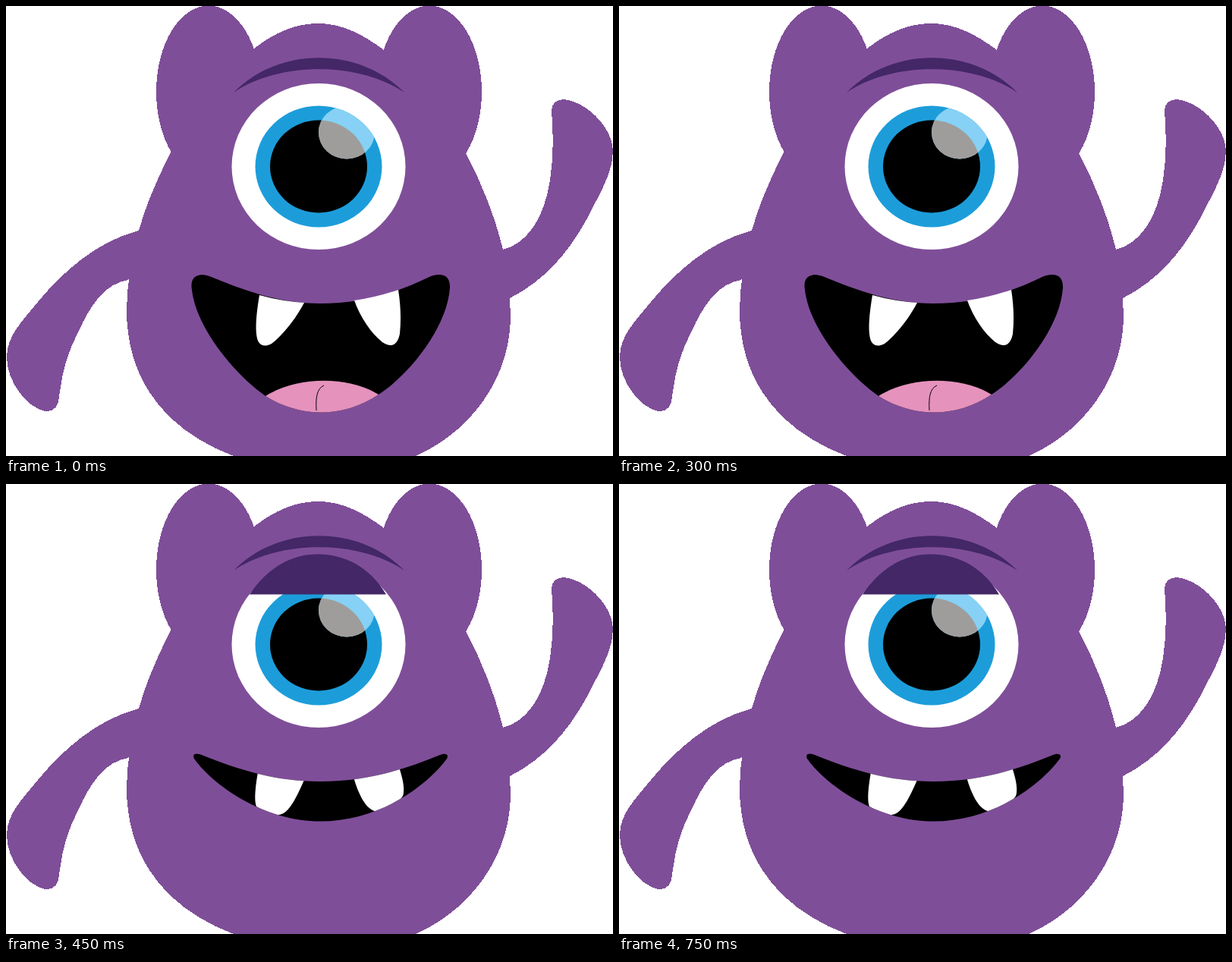
Recreate the animation shown at these times as an HTML page. Size 800 by 593 pixels, loop 900 ms.

```html
<!DOCTYPE html>
<html lang="en">
<head>
<meta charset="utf-8">
<title>Purple monster</title>
<style>
  html, body { margin: 0; width: 100%; height: 100%; overflow: hidden; background: #fff; }
  svg { display: block; width: 100%; height: 100%; }
</style>
</head>
<body>
<svg viewBox="0 0 800 593" preserveAspectRatio="none">
  <defs>
    <ellipse id="iris" cx="412" cy="211.5" rx="83.5" ry="80"/>
    <ellipse id="pupil" cx="412" cy="211.5" rx="64" ry="61"/>
    <ellipse id="glint" cx="449" cy="166.5" rx="37" ry="35"/>
    <path id="smirk" d="M248 362C245 356 250 354 258 357C308 377 355 392 414 392C475 392 523 377 572 357
      C580 354 584 357 581 362C552 401 489 444.500 414 444.500C339 444.500 272 396 248 362Z"/>
    <clipPath id="inIris"><use href="#iris"/></clipPath>
    <clipPath id="inPupil"><use href="#pupil"/></clipPath>
    <clipPath id="inSmirk"><use href="#smirk"/></clipPath>
  </defs>

  <g id="body" fill="#7f4e99" shape-rendering="crispEdges">
    <ellipse cx="267" cy="113" rx="69" ry="113.5"/>
    <ellipse cx="558" cy="113" rx="69" ry="113.5"/>
    <path d="M412 23C380 23 353 36 327 56C285 88 245 139 217 193C200 226 185 260 175 296
      C164 335 160 365 159 400C159 495 212 560 300 593H540C612 561 664 492 665 410L664 385
      C663 365 660 340 655 321C645 280 628 235 607 196C580 146 540 90 498 58C470 37 442 23 412 23Z"/>
    <path d="M175 296C120 310 75 350 42 390C20 417 1 435 1 463C1 495 28 530 52 534
      C63 535 69 528 70 515C74 480 82 455 95 430C112 393 130 366 161 361L190 330Z"/>
    <path d="M655 321C690 312 709 275 716 235C721 205 722 175 719 138C719 128 726 123 735 123
      C765 126 800 160 800 192C800 215 787 240 774 264C752 310 718 358 664 385L640 350Z"/>
  </g>

  <g id="eye">
    <path fill="#432766" d="M300 114C360 53 465 53 525 114C465 73 360 73 300 114Z"/>
    <ellipse cx="412" cy="211.5" rx="114.5" ry="109.5" fill="#fff"/>
    <use href="#iris" fill="#1c9dda"/>
    <use href="#pupil"/>
    <g clip-path="url(#inIris)"><use href="#glint" fill="#86d1f5"/></g>
    <g clip-path="url(#inPupil)"><use href="#glint" fill="#9f9d9b"/></g>
  </g>

  <g id="laughing">
    <path d="M245 374C242 357 252 351 268 356C315 375 360 392 414 392C470 392 515 378 560 356
      C575 351 586 355 585 372C581 425 530 487 491 512C445 543 388 543 342 514C295 480 250 420 245 374Z"/>
    <path fill="#e592bd" d="M342 514C385 487.500 450 487.500 491 512C445 543 388 543 342 514Z"/>
    <path fill="none" stroke="#000" d="M409 533C408 515 410 504 419 500"/>
    <g fill="#fff">
      <path d="M334 381C330 405 327 432 333 443C338 450 347 449 356 440C370 427 383 410 393 391Q363 389 334 381Z"/>
      <path d="M459 388C467 410 481 431 496 443C508 451 516 447 519 432C521 412 520 393 517 374Q488 384 459 388Z"/>
    </g>
  </g>

  <g id="smirking" visibility="hidden">
    <path fill="#432766" d="M321 145.500C345 110 376 92.500 411 92.500C446 92.500 479 109 501 145.500Z"/>
    <use href="#smirk"/>
    <g fill="#fff" clip-path="url(#inSmirk)">
      <path d="M333 375C328 400 327 418 330 425Q343 433 357 436C370 437 380 420 393 390Z"/>
      <path d="M458 386C464 408 474 428 486 431C498 431 515 424 523 411C526 402 523 388 517 370Z"/>
    </g>
  </g>
</svg>
<script>
  const POSE_MS = 150;
  const laughing = document.getElementById("laughing");
  const smirking = document.getElementById("smirking");
  const show = (group, visible) =>
    group.setAttribute("visibility", visible ? "visible" : "hidden");

  function draw() {
    const isSmirk = Math.floor(performance.now() / POSE_MS) % 2 === 1;
    show(laughing, !isSmirk);
    show(smirking, isSmirk);
    requestAnimationFrame(draw);
  }
  draw();
</script>
</body>
</html>
```
